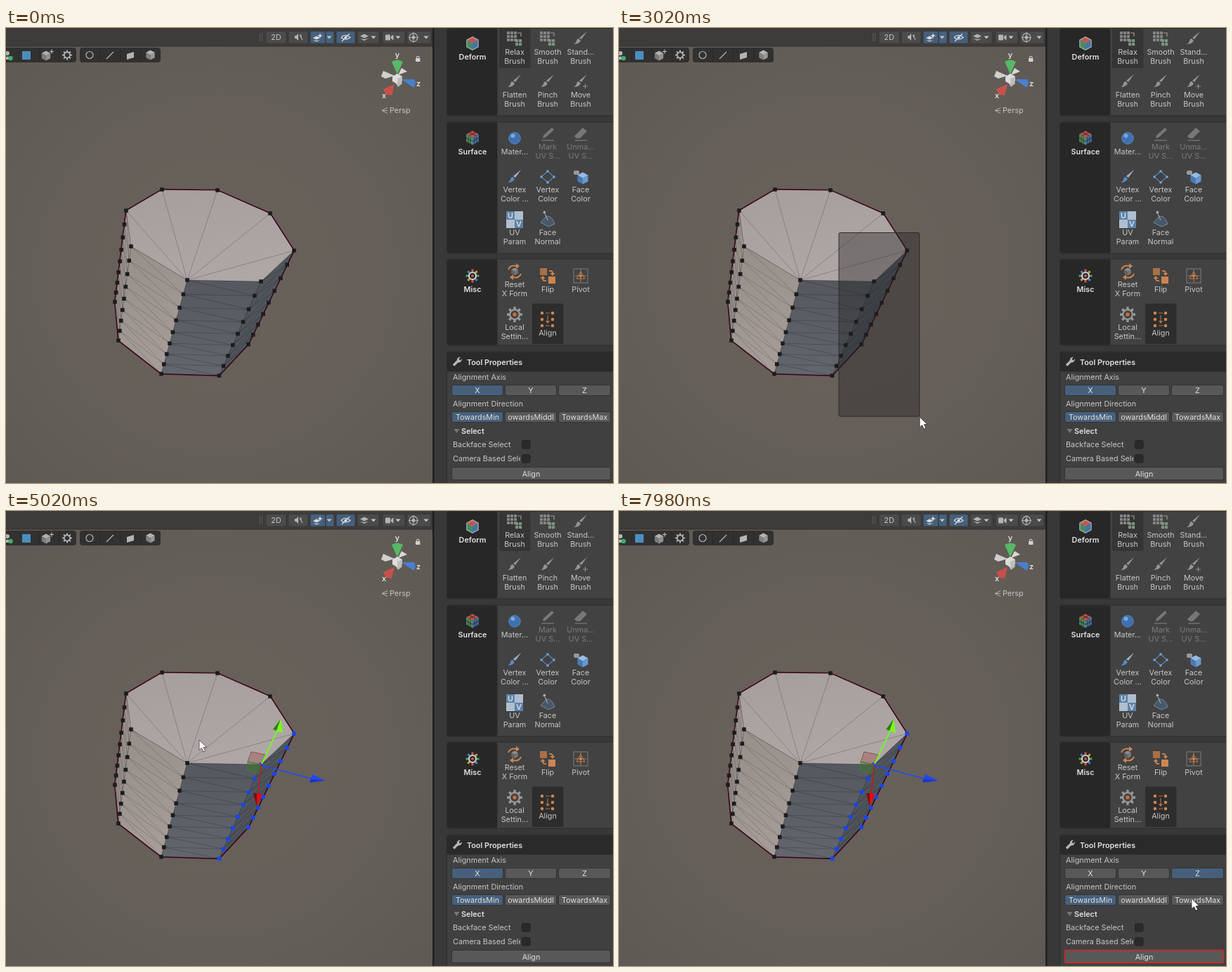
Recreate the animation shown at these times as an HTML page. Size 864 by 648 pixels, loop 8 s.

```html
<!DOCTYPE html>
<html lang="en">
<head>
<meta charset="utf-8">
<title>Align tool</title>
<style>
html, body { margin: 0; width: 100%; height: 100%; overflow: hidden; background: #383838; }
svg { display: block; width: 864px; height: 648px; }
text { font: 10.8px Inter, "Liberation Sans", sans-serif; fill: #c6c6c6; white-space: pre; }
text.b { font-weight: 600; fill: #e0e0e0; }
text.dim { fill: #7c7c7c; }
text.mid { text-anchor: middle; }
</style>
</head>
<body>
<svg id="stage" viewBox="0 0 864 648" xmlns="http://www.w3.org/2000/svg">
  <defs>
    <radialGradient id="bg" gradientUnits="userSpaceOnUse" cx="300" cy="350" r="430">
      <stop offset="0" stop-color="#69625b"/><stop offset=".6" stop-color="#655f59"/><stop offset="1" stop-color="#5e5954"/>
    </radialGradient>
    <linearGradient id="lid" x1="0" y1="0" x2=".4" y2="1">
      <stop offset="0" stop-color="#a69e9c"/><stop offset="1" stop-color="#afa7a6"/>
    </linearGradient>
    <linearGradient id="left" x1="0" y1="0" x2=".3" y2="1">
      <stop offset="0" stop-color="#958e89"/><stop offset="1" stop-color="#a59c98"/>
    </linearGradient>
    <linearGradient id="front" x1="0" y1="0" x2="0" y2="1">
      <stop offset="0" stop-color="#55585e"/><stop offset="1" stop-color="#62666d"/>
    </linearGradient>
    <clipPath id="camClip"><rect x="630" y="600" width="102" height="24"/></clipPath>
  </defs>
</svg>
<script>
const stage = document.getElementById('stage');
let layer = stage;

function add(tag, attrs, parent = layer) {
  const el = document.createElementNS('http://www.w3.org/2000/svg', tag);
  set(el, attrs);
  return parent.appendChild(el);
}
function set(el, attrs) {
  for (const k in attrs) el.setAttribute(k, attrs[k]);
}
function group(attrs, draw) {
  const old = layer;
  const g = layer = add('g', attrs);
  draw();
  layer = old;
  return g;
}
const box = (x, y, w, h, fill, rx = 0, more = {}) => add('rect', { x, y, width: w, height: h, fill, rx, ...more });
const disc = (cx, cy, r, fill, more = {}) => add('circle', { cx, cy, r, fill, ...more });
const ring = (cx, cy, r, stroke, w = 1.2) => disc(cx, cy, r, 'none', { stroke, 'stroke-width': w });
const shape = (d, fill, more = {}) => add('path', { d, fill, ...more });
const line = (d, stroke, w = 1.2) => shape(d, 'none', { stroke, 'stroke-width': w });
const poly = (pts, fill, more = {}) => add('polygon', { points: pts.join(' '), fill, ...more });
const label = (x, y, s, cls = 'mid', more = {}) => {
  const t = add('text', { x, y, class: cls, ...more });
  t.textContent = s;
  return t;
};
const at = (x, y, draw) => group({ transform: `translate(${x} ${y})` }, draw);

// ---------- icons, each centred on 0,0 ----------
const GREY = '#b4b4b4', ORANGE = '#cc8550', BLUE = '#5788c2';

function cube(r, a, b, c) {
  const h = r * .52, w = r * .88;
  shape(`M0 ${-r}L${w} ${-h}L0 0L${-w} ${-h}Z`, a);
  shape(`M${-w} ${-h}L0 0V${r}L${-w} ${h}Z`, b);
  shape(`M${w} ${-h}L0 0V${r}L${w} ${h}Z`, c);
}
function gear(r, color, hole, w = 1.4) {
  for (let i = 0; i < 8; i++) box(-w, -r, w * 2, 4, color, .5, { transform: `rotate(${i * 45})` });
  ring(0, 0, r * .62, color, w * 1.3);
  if (hole) disc(0, 0, r * .25, hole);
}
function brush(color = '#959595') {
  shape('M9 -10L1 1L-2 -1Z', color);
  shape('M-3 0L0 3Q-2 8 -10 8Q-6 6 -6 3Q-5 0 -3 0Z', color);
}
// grid of cells being smoothed into green ones
function cells() {
  for (let i = 0; i < 9; i++) box(-11 + i % 3 * 5, -10 + (i / 3 | 0) * 5, 4, 4, '#858585', .5);
  line('M4 -8H9V-3', '#9a9a9a', 1.2);
  for (let i = 0; i < 4; i++) box(1 + i % 2 * 5, 1 + (i / 2 | 0) * 5, 4.2, 4.2, '#7d9482', .8);
}
function pencil(color) {
  shape('M6 -9L9 -6L-3 5L-7 6L-6 2Z', color);
  line('M-9 9H9', color, 1.3);
}
function arrows(color) {
  line('M-9 -3Q-6 -10 2 -8M9 3Q6 10 -2 8', color, 2);
  shape('M2 -12L7 -8L2 -4ZM-2 12L-7 8L-2 4Z', color);
}
const down = x => shape(`M${x - 3.5} 11.5H${x + 3.5}L${x} 15.5Z`, '#c4c4c4');

const icons = {
  relax: cells,
  brush: () => brush(),
  move() { brush(); line('M3 7H10M6.5 3.5V10.5', '#959595', 1); },
  mater() { disc(0, 0, 8.5, '#3f70b0'); disc(-2.5, -3.5, 3, '#7ba6dc'); ring(0, 0, 8.3, '#5a8ac6', .8); },
  mark: () => pencil('#777'),
  unmark() { shape('M3 -9L9 -4L-1 6H-6L-9 3Z', '#777'); line('M-8 9H9', '#777', 1.3); },
  paint() { brush(BLUE); shape('M9 -10L1 1L-2 -1Z', '#a3afbf'); },
  vertex() {
    line('M0 -8L9 0L0 8L-9 0Z', BLUE, 1.1);
    for (const [x, y] of [[0, -8], [9, 0], [0, 8], [-9, 0]]) box(x - 1.5, y - 1.5, 3, 3, '#7ca6d8');
  },
  face() { at(3, 2, () => cube(8.5, '#97bce4', '#4a7ab5', '#6b98cc')); box(-10, -9, 8, 6, '#999', 2); },
  uv() {
    box(-12, -12, 24, 24, '#5d83ab');
    box(0, -12, 12, 12, '#b0bfcf'); box(-12, 0, 12, 12, '#b0bfcf');
    label(-6, -2, 'U', 'b mid'); label(6, 10, 'V', 'b mid');
  },
  normal() {
    shape('M-10 4L-2 -5Q6 -6 10 6L1 10Z', '#48586a', { stroke: '#7f9ab6', 'stroke-width': .8 });
    line('M0 1L-5 -11', '#b6b6b6', 1); shape('M-7 -9L-5 -13L-2 -10Z', '#b6b6b6');
  },
  reset() { arrows(ORANGE); cube(5.5, '#8d8d8d', '#626262', '#747474'); },
  flip() {
    box(-11, -11, 10, 10, '#a96f45'); box(1, 1, 10, 10, ORANGE);
    line('M2 -7Q8 -8 7 -2M-2 7Q-8 8 -7 2', ORANGE, 1.8); shape('M3.5 -4H10.5L7 0ZM-10.5 4H-3.5L-7 0Z', ORANGE);
  },
  pivot() {
    box(-10, -10, 20, 20, 'none', 0, { stroke: '#8c8c8c', 'stroke-width': .8 });
    line('M0 -6L6 4H-6ZM0 -9V9M-8 0H8', ORANGE, .9); disc(0, 0, 2, ORANGE);
  },
  local: () => gear(11, '#989898', '#d0693a', 1.7),
  align() {
    for (const x of [-8, 7]) for (const y of [-9, 0, 9]) disc(x, y, 2.3, ORANGE);
    line('M-3 -9H3M0 -6V3M-3 9H3', '#b87145', 1.1);
    shape('M-3 2H3L0 6Z', '#b87145');
  }
};

// ---------- scene view ----------
box(0, 0, 608, 648, 'url(#bg)');
box(0, 0, 608, 26, '#3d3c3b');
box(0, 25.5, 608, 1, '#33312f');
line('M361.5 7V19M364.5 7V19', '#5c5c5c', 1);
const topBtn = (x, w, on) => box(x, 4.5, w, 17.5, on ? '#46607c' : '#4b4b4b', 2, { stroke: '#363535', 'stroke-width': .7 });
topBtn(370, 29); topBtn(402, 28); topBtn(433, 21.5, 1); topBtn(455, 12, 1); topBtn(470, 27, 1);
topBtn(500, 31); topBtn(536, 32); topBtn(571, 34);
label(384.5, 17, '2D');
[460, 523, 558, 598].forEach(down);
shape('M411 11H413L416 8V18L413 15H411Z', GREY); line('M418 10L422 17M420 9V14', GREY, 1.1);
shape('M437 14L442 11.5L447 14L442 16.5ZM437 17L442 19.5L447 17L442 18Z', '#ddd');
shape('M447 7L448 10L451 11L448 12L447 15L446 12L443 11L446 10Z', '#ddd');
line('M477 13.5Q483 7 490 13.5Q483 19 477 13.5M478 19L489 8', '#ddd', 1.2); disc(483.5, 13.5, 2, '#ddd');
shape('M504 11.5L510 8.5L516 11.5L510 14.5ZM504 15L510 18L516 15L510 16Z', GREY);
box(540, 9.5, 7, 8, GREY, 1); shape('M548 12L551.5 9.5V17.5L548 15Z', GREY);
ring(580, 13.5, 5.8, GREY); line('M580 6V21M573 13.5H587', GREY, 1); disc(580, 13.5, 2.4, GREY);

box(-4, 28.5, 103.5, 20, '#323131', 3, { stroke: '#2a2929', 'stroke-width': .8 });
box(105.5, 28.5, 114, 20, '#323131', 3, { stroke: '#2a2929', 'stroke-width': .8 });
line('M18.5 29V48M47.5 29V48M75.5 29V48M133.5 29V48M162.5 29V48M191.5 29V48', '#2a2929', 1);
disc(2, 36, 3, GREY); shape('M-3 45Q2 36 7 45Z', GREY); disc(6.5, 43, 3.2, '#3fae68');
box(23, 33, 12, 12, '#4a8fc0');
at(57, 39.5, () => { cube(7, '#b0b0b0', '#7c7c7c', '#929292'); line('M5 -6H11M8 -9V-3', '#c0c0c0', 1.1); });
at(87, 38.5, () => gear(7, GREY, null, 1));
ring(119, 38.5, 5, GREY); line('M143 44L153 34', GREY); shape('M172 37L182 34V42L172 45Z', GREY);
at(205.5, 38.5, () => cube(7, '#b4b4b4', '#828282', '#989898'));

// orientation widget
shape('M553 68L537 61L534 69L540 72Z', '#cfcfcc'); shape('M558 67L563 57L571 62Z', '#d8d8d5');
shape('M553 80L537 87L541 95L549 96Z', '#c8504c');
shape('M552 74L558 84L564 79L560 70Z', '#b9b9b6');
shape('M557 66L549 48Q557 43 565 48Z', '#57b866');
shape('M563 73L581 73Q585 79 580 85Z', '#4a7fce');
shape('M550 69L557 65L564 69V76L557 80L550 76Z', '#dcdcd9'); shape('M557 72L564 69V76L557 80Z', '#bdbdb9');
label(557, 42, 'y', 'b mid'); label(538, 100, 'x', 'b mid'); label(587, 83, 'z', 'b mid');
box(583, 43, 6.5, 5, '#d0d0d0', 1); line('M584.5 43V41.5Q586.2 39 588 41.5V43', '#d0d0d0', 1.1);
line('M543 113.5L535 117.5L543 121.5M543 117.5H536', '#bcbcbc', .9);
label(546, 121, 'Persp', '');

// ---------- mesh ----------
const N = 8;
const rim = [[171, 260], [222, 230], [301, 231], [376, 264], [410, 317], [363, 361], [258, 359], [178, 311]];
// perspective spacing between the two ends of a column
function column(a, b) {
  return Array.from({ length: N + 1 }, (_, k) => {
    const s = k * 1.252 / (N + .252 * k);
    return [a[0] + (b[0] - a[0]) * s, a[1] + (b[1] - a[1]) * s];
  });
}
const colA = column(rim[0], [155, 390]), colH = column(rim[7], [160, 445]);
const colG = column(rim[6], [221, 492.5]), colF = column(rim[5], [303.5, 495]);
const colE = column(rim[4], [345, 450.5]);
const seg = (a, b) => `M${a}L${b}`;

function wall(p, q, fill, ink) {
  poly([...p, ...q.slice().reverse()], fill);
  let d = seg(p[0], p[N]) + seg(q[0], q[N]);
  for (let k = 0; k <= N; k++) {
    d += seg(p[k], q[k]);
    if (k < N) d += seg(p[k], q[k + 1]);
  }
  line(d, ink, .6);
}
const outline = [...rim.slice(0, 5), colE[N], colF[N], colG[N], colH[N], colA[N]];
poly(outline, '#555a61', { stroke: '#6f1233', 'stroke-width': 2.4, 'stroke-linejoin': 'round' });
wall(colA, colH, '#a29994', 'rgba(30,28,28,.42)');
wall(colH, colG, 'url(#left)', 'rgba(40,36,34,.4)');
wall(colG, colF, 'url(#front)', 'rgba(25,26,30,.45)');
wall(colF, colE, '#50555c', 'rgba(25,28,34,.5)');
poly(rim, 'url(#lid)');
line([0, 1, 2, 3, 4].map(i => seg(rim[6], rim[i])).join(''), 'rgba(50,45,45,.45)', .65);
line(seg(rim[7], rim[6]) + seg(rim[6], rim[5]) + seg(rim[5], rim[4]) + seg(rim[0], rim[7]), 'rgba(40,38,38,.42)', .65);
poly(outline, 'none', { stroke: '#240a16', 'stroke-width': 1.1 });

const dot = ([x, y]) => box(x - 2.8, y - 2.8, 5.6, 5.6, '#1c1c1c');
[rim[1], rim[2], rim[3], ...colA, ...colH, ...colG].forEach(dot);
const dotsF = colF.map(dot), dotsE = colE.map(dot);
const firstPick = [...dotsF.slice(0, 7), ...dotsE], secondPick = dotsF.slice(7);

const marquee = box(0, 0, 0, 0, 'rgba(32,32,32,.38)', 2, { stroke: '#2b2a29', 'stroke-width': 1 });

// move handle
const handle = group({}, () => {
  poly([[349, 343], [369, 347], [363, 361], [344, 357]], 'rgba(150,65,60,.35)', { stroke: '#84423f', 'stroke-width': .8 });
  poly([[344, 357], [362, 361], [360, 374], [343, 369]], 'rgba(60,120,40,.45)', { stroke: '#2f8a30', 'stroke-width': .8 });
  line('M363 362L434 381', '#2348f5', 1.4);
  shape('M454 384L432 386.5L436 375Z', '#2246f2'); shape('M454 384L432 386.5L434 382Z', '#1834c0');
  line('M363 362L359 403', '#c81414', 1.5);
  shape('M357 421L352 402L365 403Z', '#e01010'); shape('M357 421L352 402L357 402Z', '#7d0b0b');
  line('M364 360L387 311', '#74f52a', 2);
  shape('M391 296L380 311L394 316Z', '#7dff20'); shape('M391 296L380 311L385 313Z', '#2f7d12');
});

// ---------- panel ----------
box(607, 0, 257, 648, '#383838');
box(607, 0, 2.5, 648, '#202020');

function section(y, h, title, icon, titleY) {
  box(627.5, y, 240, h, '#424242', 3, { stroke: '#272727', 'stroke-width': .8 });
  box(628, y + .5, 71.5, h - 1, '#272727', 3);
  at(664, titleY - 23, icon);
  label(664, titleY, title, 'b mid');
}
function tool(col, y, icon, l1, l2, ty, cls = 'mid') {
  const x = 724 + col * 47;
  at(x, y, icons[icon]);
  label(x, ty, l1, cls);
  if (l2) label(x, ty + 13, l2, cls);
}
section(.5, 124.5, 'Deform', () => {
  cube(10, '#b9aaa6', '#9fb0a5', '#a0aab4');
  cube(8.5, '#bd5a50', '#458a64', '#4274a6');
}, 45);
section(134, 187, 'Surface', () => {
  cube(10, '#b9544b', '#4f935f', '#4574ac');
  line('M-6 -2V7M-3 -1V9M3 -1V9M6 -2V7M-9 0L0 5L9 0M-5 -8L5 -3M5 -8L-5 -3', '#2b2b2b', .9);
}, 179.5);
section(329, 123, 'Misc', () => {
  ['#c9564b', '#c9923f', '#53a35d', '#4680ba'].forEach((c, i) =>
    [0, 180].forEach(a => box(-1.6, -9.5, 3.2, 4, c, 1, { transform: `rotate(${i * 45 + a})` })));
  ring(0, 0, 5, '#d0d0d0', 2.2); disc(0, 0, 2, '#c9564b');
}, 376);
box(702, 1, 44.5, 56, '#353535', 2);
box(749, 392.5, 44.5, 57.5, '#2d2d2d', 2);

tool(0, 15, 'relax', 'Relax', 'Brush', 38);
tool(1, 15, 'relax', 'Smooth', 'Brush', 38);
tool(2, 15, 'brush', 'Stand...', 'Brush', 38);
tool(0, 76, 'brush', 'Flatten', 'Brush', 99);
tool(1, 76, 'brush', 'Pinch', 'Brush', 99);
tool(2, 76, 'move', 'Move', 'Brush', 99);
tool(0, 157, 'mater', 'Mater...', '', 179.5);
tool(1, 151, 'mark', 'Mark', 'UV S...', 173, 'dim mid');
tool(2, 151, 'unmark', 'Unma...', 'UV S...', 173, 'dim mid');
tool(0, 212, 'paint', 'Vertex', 'Color ...', 234);
tool(1, 212, 'vertex', 'Vertex', 'Color', 234);
tool(2, 212, 'face', 'Face', 'Color', 234);
tool(0, 273, 'uv', 'UV', 'Param', 295);
tool(1, 273, 'normal', 'Face', 'Normal', 295);
tool(0, 347, 'reset', 'Reset', 'X Form', 369);
tool(1, 353, 'flip', 'Flip', '', 376);
tool(2, 353, 'pivot', 'Pivot', '', 376);
tool(0, 408, 'local', 'Local', 'Settin...', 430);
tool(1, 415, 'align', 'Align', '', 438);

box(627.5, 461, 240, 200, '#404040', 3, { stroke: '#272727', 'stroke-width': .8 });
box(628, 461.5, 240, 28, '#2a2a2a', 3);
at(642, 475.5, () => {
  line('M-5 5L2 -2', '#b8b8b8', 3.4);
  shape('M0 -1Q-1 -7 5 -7L2.5 -4L4.5 -2L7 -4.5Q7 1 1 1Z', '#b8b8b8');
});
label(656, 479.5, 'Tool Properties', 'b');

const OFF = '#585858', ON = '#46607c', EDGE = '#303030';
function button(x, y, w, h, s, fill) {
  const b = box(x + .5, y + .5, w - 1, h - 1, fill, 2.5, { stroke: EDGE, 'stroke-width': .9 });
  label(x + w / 2, y + h / 2 + 4, s, 'mid', { style: 'fill:#e0e0e0' });
  return b;
}
label(636, 501, 'Alignment Axis', '');
const btnX = button(634, 508, 74, 16, 'X', ON);
button(710, 508, 74, 16, 'Y', OFF);
const btnZ = button(786, 508, 75, 16, 'Z', OFF);
label(636, 539, 'Alignment Direction', '');
button(634, 546, 74, 16, 'TowardsMin', ON);
button(710, 546, 74, 16, 'owardsMiddl', OFF);
button(786, 546, 75, 16, 'TowardsMax', OFF);
shape('M637.5 571H645.5L641.5 577Z', '#777');
label(648, 577.5, 'Select', 'b');
label(636, 597, 'Backface Select', '');
label(636, 617, 'Camera Based Selection', '', { 'clip-path': 'url(#camClip)' });
box(734.5, 587.5, 11.5, 11.5, '#2a2a2a', 2, { stroke: '#222' });
box(734.5, 607.5, 11.5, 11.5, '#2a2a2a', 2, { stroke: '#222' });
const btnAlign = button(634, 625, 227, 19, 'Align', OFF);

const pulse = ring(0, 0, 0, '#f01818', 2);
const cursor = shape('M0 0V14.6L3.5 11.5L6 17L8.6 15.8L6.2 10.6H10.8Z', '#fff',
  { stroke: '#222', 'stroke-width': .7, 'stroke-linejoin': 'round' });

// ---------- motion ----------
const path = [
  [80, 742, -4], [200, 690, 70], [400, 530, 290], [560, 410, 402], [650, 365, 414], [780, 325, 350], [870, 315, 317],
  [1300, 315, 308], [1740, 313, 294], [1840, 313, 293], [1970, 313, 291],
  [2200, 313, 291], [2270, 323, 306], [2360, 355, 352], [2520, 392, 432], [2700, 415, 508], [2880, 426, 548], [3020, 428, 554],
  [3820, 428, 554], [3980, 431, 547], [4157, 431, 546], [4230, 412, 520], [4340, 335, 410], [4460, 284, 340], [4490, 284, 338],
  [4620, 277, 326], [4750, 271, 324], [5020, 275, 326], [5180, 275, 326], [5330, 318, 346], [5640, 499, 433],
  [5800, 625, 505], [5910, 668, 528], [6230, 668, 528], [6350, 685, 526], [6600, 785, 512], [6760, 812, 508],
  [7060, 812, 508], [7200, 800, 525], [7450, 748, 595], [7660, 735, 609], [7850, 735, 609], [7970, 815, 552], [8000, 815, 552]
];
function place(t) {
  let i = path.findIndex(p => p[0] > t);
  if (i < 0) return path[path.length - 1].slice(1);
  if (i === 0) return path[0].slice(1);
  const a = path[i - 1], b = path[i], s = (t - a[0]) / (b[0] - a[0]);
  return [a[1] + (b[1] - a[1]) * s, a[2] + (b[2] - a[2]) * s];
}
const drags = [[2210, 3240, 313, 291.5], [4160, 4880, 430.5, 545.5]];
const clicks = [[2210, 313, 291.5], [4157, 431, 546], [6825, 812, 510]];
const LAG = 22, GROW = 500;

function render(t) {
  const [x, y] = place(t);
  set(cursor, { transform: `translate(${x} ${y})`, opacity: t < 80 ? 0 : 1 });

  const drag = drags.find(d => t >= d[0] && t < d[1]);
  set(marquee, { opacity: drag ? 1 : 0 });
  if (drag) {
    const [px, py] = place(t - LAG), [, , sx, sy] = drag;
    set(marquee, {
      x: Math.min(px, sx), y: Math.min(py, sy),
      width: Math.abs(px - sx), height: Math.abs(py - sy)
    });
  }

  const click = clicks.find(c => t >= c[0] && t < c[0] + GROW);
  set(pulse, { opacity: 0 });
  if (click) {
    const s = (t - click[0]) / GROW;
    set(pulse, { cx: click[1], cy: click[2], r: 24 * s, 'stroke-width': 2.1 - 1.2 * s, opacity: Math.min(1, (1 - s) * 2.8) });
  }

  const tint = (dots, on) => dots.forEach(d => set(d, { fill: on ? '#1745f5' : '#1c1c1c' }));
  tint(firstPick, t >= 3240);
  tint(secondPick, t >= 4880);
  set(handle, { opacity: t >= 3240 ? 1 : 0 });
  set(btnZ, { fill: t >= 6830 ? ON : OFF });
  set(btnX, { fill: t >= 7060 ? OFF : ON });
  const armed = t >= 6560;
  set(btnAlign, { stroke: armed ? '#e02222' : EDGE, 'stroke-width': armed ? 1.4 : .9 });
}

const start = performance.now();
function tick() {
  render((performance.now() - start) % 8000);
  requestAnimationFrame(tick);
}
tick();
</script>
</body>
</html>
```
